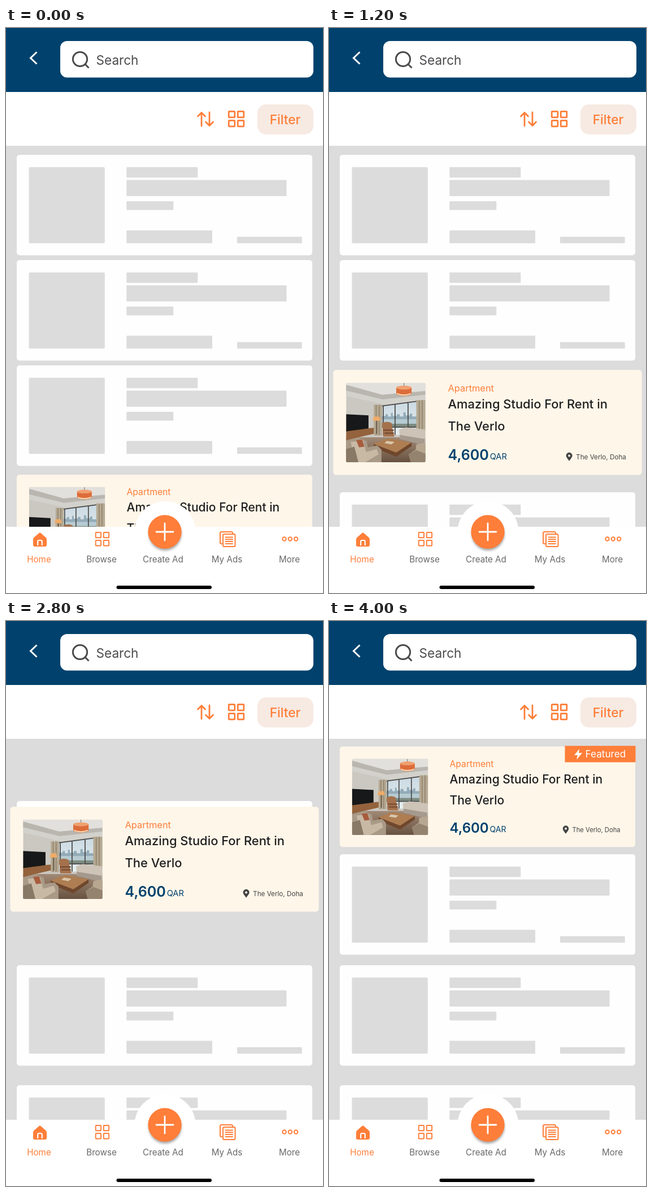
Animation of 561 by 998 pixels, one loop 5.8 s. Source, as an HTML page:

```html
<!DOCTYPE html>
<html lang="en">
<head>
<meta charset="utf-8">
<title>Featured listing</title>
<style>
  html, body { margin: 0; width: 100%; height: 100%; overflow: hidden; background: #fff; }
  svg { display: block; width: 100vw; height: 100vh; font-family: Inter, "Open Sans", sans-serif; }
  .line { fill: none; stroke: #ff7e39; stroke-linecap: round; stroke-linejoin: round; }
  .orange { fill: #ff7e39; }
  .navy { fill: #00426d; }
  .title { font-size: 21px; font-weight: 500; fill: #1f1f1f; }
  .nav text { font-size: 15.2px; text-anchor: middle; fill: #686868; }
  .nav text.orange { fill: #ff7e39; }
</style>
</head>
<body>
<svg viewBox="0 0 561 998">
  <defs>
    <g id="blank">
      <rect x="19" width="523" height="177.5" rx="5" fill="#fefefe"/>
      <g fill="#dcdcdc">
        <rect x="40.5" y="21.7" width="134.3" height="134.5" rx="2"/>
        <rect x="213.3" y="21.7" width="126" height="18.5" rx="1"/>
        <rect x="213.3" y="44.4" width="283.2" height="28.6" rx="1"/>
        <rect x="213.3" y="82" width="83" height="15.5" rx="1"/>
        <rect x="213.3" y="133.4" width="151.7" height="22.8" rx="1"/>
        <rect x="409" y="144.8" width="114.7" height="11.5" rx="1"/>
      </g>
    </g>
    <g id="grid" class="line">
      <rect width="10.6" height="10.6" rx="1"/>
      <rect x="16" width="10.6" height="10.6" rx="1"/>
      <rect y="16" width="10.6" height="10.6" rx="1"/>
      <rect x="16" y="16" width="10.6" height="10.6" rx="1"/>
    </g>
    <clipPath id="frame"><rect width="134.3" height="134.3" rx="2"/></clipPath>
    <linearGradient id="sky" x2="0" y2="1">
      <stop stop-color="#c9d8e2"/><stop offset="1" stop-color="#e6eeee"/>
    </linearGradient>
    <linearGradient id="floor" x2="0" y2="1">
      <stop stop-color="#a18a76"/><stop offset="1" stop-color="#66503f"/>
    </linearGradient>
    <filter id="soft" x="-30%" y="-30%" width="160%" height="160%"><feGaussianBlur stdDeviation="2.2"/></filter>
  </defs>

  <rect y="200" width="561" height="690" fill="#dcdcdc"/>
  <use href="#blank" class="slot"/>
  <use href="#blank" class="slot"/>
  <use href="#blank" class="slot"/>

  <g id="card">
    <rect x="19" width="523" height="177.5" rx="5" fill="#fef6e9"/>
    <g transform="translate(40.8 21.8)" clip-path="url(#frame)">
      <rect width="135" height="135" fill="#cbc8c2"/>
      <path d="M0 0H135V30L66 37L0 22Z" fill="#d3d1cc"/>
      <path d="M0 3L60 20L135 14V20L62 28L0 13Z" fill="#b9b6b0"/>
      <path d="M0 0H135V13L62 20L0 3Z" fill="#e2e0dc"/>
      <rect y="92" width="135" height="43" fill="url(#floor)"/>
      <path d="M61 39L135 29V88H61Z" fill="url(#sky)"/>
      <path d="M61 62V56H67V53H71V57H76V51H79V56H86V53H91V57H97V50H101V55H108V52H112V57H122V62Z" fill="#93abb8"/>
      <path d="M61 62H122V69H61Z" fill="#b6cbd2"/>
      <path d="M61 69H122V75H61Z" fill="#7d8b82"/>
      <path d="M61 39L122 31M63 39V88M83 36V88M105 33V88M61 75H122" fill="none" stroke="#4b4a48" stroke-width="1.7"/>
      <path d="M47 37H61V89H47ZM119 29H135V83H119Z" fill="#b6a992"/>
      <path d="M51 37V88M56 37V88M124 30V82M129 29V82" stroke="#8e826e" stroke-width="1.5"/>
      <path d="M98 0V7" stroke="#777" stroke-width="1"/>
      <path d="M85 8Q98 2 111 8V19Q98 25 85 19Z" fill="#dc6c3b"/>
      <ellipse cx="98" cy="8" rx="13" ry="3.3" fill="#f0a071"/>
      <path d="M86 18Q98 23 110 18" fill="none" stroke="#ffd9b0" stroke-width="2"/>
      <path d="M0 80L47 76V86L0 97Z" fill="#94623c"/>
      <path d="M0 53L38 55V77L0 82Z" fill="#171819"/>
      <path d="M47 57H56L58 64H45Z" fill="#efac68"/>
      <path d="M52 64V86" stroke="#665443" stroke-width="1.5"/>
      <path d="M61 68Q70 64 77 68L79 80L82 91H63Z" fill="#a5714c"/>
      <path d="M63 80H81M65 85H81" stroke="#724a33" stroke-width="2"/>
      <path d="M90 79L101 75L135 79V106L91 94Z" fill="#cdc3b7"/>
      <path d="M91 88L133 95V106L91 95Z" fill="#a59a8d"/>
      <path d="M46 103L72 94L111 101L85 118Z" fill="#ae7d52"/>
      <path d="M46 103L85 118V125L49 110ZM85 118L111 101V107L85 125Z" fill="#6f472c"/>
      <path d="M69 98L82 100L77 104L65 102Z" fill="#d8c7ab"/>
      <path d="M0 98L20 92L35 98L37 109L53 106L60 113V135H0Z" fill="#a99a87"/>
      <path d="M8 100L29 98L34 117L52 112L55 121L31 135H15Z" fill="#c8b9a5"/>
      <path d="M17 97L27 96L31 108L22 109Z" fill="#a75c3d"/>
      <path d="M0 112L14 108L21 135H0Z" fill="#887866"/>
      <path d="M106 121L118 113L119 104L135 101V135H110Z" fill="#b7a791"/>
      <path d="M106 121L119 114L135 120V135H110Z" fill="#94836f"/>
    </g>
    <text x="213.5" y="36" class="orange" font-size="15.7">Apartment</text>
    <text x="213.5" y="65.3" class="title">Amazing Studio For Rent in</text>
    <text x="213.5" y="102.3" class="title">The Verlo</text>
    <text x="213.5" y="152.3" class="navy" font-size="24" font-weight="600">4,600</text>
    <text x="284.5" y="151.5" class="navy" font-size="14">QAR</text>
    <path d="M419 154C416 150 413.7 147.400 413.700 144.900a5.300 5.300 0 0 1 10.600 0C424.300 147.400 422 150 419 154Z" fill="#444"/>
    <circle cx="419" cy="145" r="1.9" fill="#fef6e9"/>
    <text x="430.500" y="151.500" font-size="11.200" fill="#444">The Verlo, Doha</text>
  </g>

  <g id="tag">
    <rect x="417.500" y="220.500" width="125" height="29" class="orange"/>
    <path d="M443 226L434 237H440L438 245L448 233H442Z" fill="#fff"/>
    <text x="453.500" y="241.300" font-size="17.200" fill="#fff">Featured</text>
  </g>

  <rect width="561" height="113" class="navy"/>
  <path d="M54.500 42.500L43.500 53L54.500 63.500" fill="none" stroke="#fff" stroke-width="3"/>
  <rect x="96" y="23" width="448" height="64.500" rx="12" fill="#fff"/>
  <g fill="none" stroke="#4b4a4d" stroke-width="3">
    <circle cx="131" cy="55" r="12.600"/><path d="M140 64L146.500 70.500"/>
  </g>
  <text x="159.500" y="64.500" font-size="22.600" fill="#4b4a4d">Search</text>

  <rect y="113" width="561" height="95" fill="#fff"/>
  <path class="line" stroke-width="2.800" d="M346 173V149.500M339.500 156L346 149.500L352.500 156M360 149V172.500M353.500 166L360 172.500L366.500 166"/>
  <use href="#grid" x="394.200" y="147.300" stroke-width="2.800"/>
  <rect x="445" y="135" width="99" height="53" rx="15" fill="#f7eae2"/>
  <text x="494" y="169.700" class="orange" font-size="22.700" font-weight="500" text-anchor="middle">Filter</text>

  <g class="nav">
    <circle cx="281.500" cy="890" r="54" fill="#fff"/>
    <rect y="881" width="561" height="117" fill="#fff"/>
    <circle cx="281.500" cy="894" r="29" fill="#000" opacity=".35" filter="url(#soft)"/>
    <circle cx="281" cy="890" r="29.700" class="orange"/>
    <path d="M266 890H296M281 875V905" stroke="#fff" stroke-width="2.800" stroke-linecap="round"/>
    <path class="orange" d="M60 891.500Q61 891.500 62 892.500L70.500 900Q72 901.500 72 903.500V913Q72 916 69 916H51Q48 916 48 913V903.500Q48 901.500 49.500 900L58 892.500Q59 891.500 60 891.500Z"/>
    <path d="M56.200 914V907Q56.200 905 58.200 905H61.800Q63.800 905 63.800 907V914" fill="none" stroke="#fff" stroke-width="2.200"/>
    <use href="#grid" transform="translate(158.700 891) scale(.88)" stroke-width="2.200"/>
    <g class="line" stroke-width="2">
      <path d="M382 911H381Q379 911 379 909V892Q379 890 381 890H399Q401 890 401 892V893"/>
      <rect x="384" y="894" width="21.500" height="22" rx="2"/>
      <path d="M388.500 899.500H401M388.500 903.300H401M388.500 907.100H401M388.500 910.900H401"/>
      <circle cx="492.500" cy="902.500" r="3.200"/>
      <circle cx="502.800" cy="902.500" r="3.200"/>
      <circle cx="513.100" cy="902.500" r="3.200"/>
    </g>
    <text x="58.500" y="944" class="orange">Home</text>
    <text x="169" y="944">Browse</text>
    <text x="278" y="944">Create Ad</text>
    <text x="391" y="944">My Ads</text>
    <text x="501.500" y="944">More</text>
    <rect x="195.500" y="985" width="168.500" height="6" rx="3"/>
  </g>
</svg>
<script>
  const LOOP = 5800, STEP = 200;
  const slots = document.querySelectorAll('.slot');
  const card = document.getElementById('card');
  const tag = document.getElementById('tag');

  // Ease-in-out, cubic-bezier(.42, 0, .58, 1), solved by bisection
  function ease(t, start, length) {
    const x = Math.min(1, Math.max(0, (t - start) / length));
    if (x === 0 || x === 1) return x;
    let lo = 0, hi = 1;
    for (let i = 0; i < 24; i++) {
      const s = (lo + hi) / 2, r = 1 - s;
      if (1.26 * s * r * r + 1.74 * s * s * r + s * s * s < x) lo = s; else hi = s;
    }
    return lo * lo * (3 - 2 * lo);
  }

  function draw(t) {
    const first = ease(t, 538, 600);
    const second = ease(t, 1495, 500);
    const third = ease(t, 2640, 353);
    const grow = ease(t, -10, 600) - ease(t, 3000, 200);

    const tops = [224 + 188 * ease(t, 2600, 400), 410 + 198 * second, 596 + 224 * first];
    slots.forEach((slot, i) => slot.setAttribute('y', tops[i]));

    const middle = 877.75 - 181 * first - 196.25 * second - 190 * third;
    card.setAttribute('transform',
      `translate(280.5 ${middle}) scale(${1 + 0.044 * grow}) translate(-280.5 -88.75)`);
    tag.setAttribute('opacity', ease(t, 3250, 700));
  }

  const begin = performance.now();
  function tick() {
    const t = (performance.now() - begin) % LOOP;
    draw(Math.floor(t / STEP) * STEP);
    requestAnimationFrame(tick);
  }
  tick();
</script>
</body>
</html>
```
